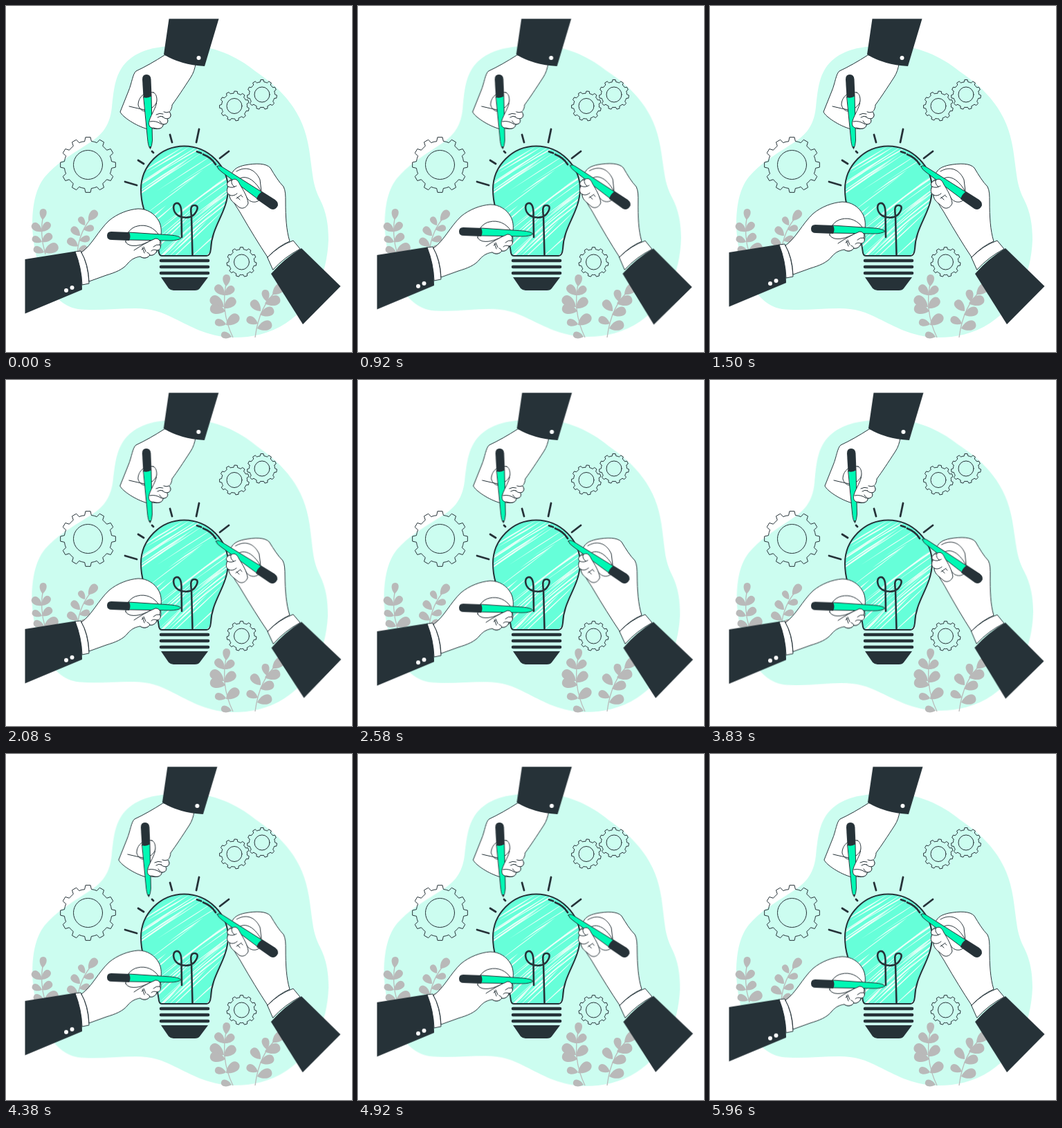
Recreate the animation shown at these times as an HTML page. Size 500x500 px, loop 6 s.

```html
<!DOCTYPE html>
<html lang="en">
<head>
<meta charset="utf-8">
<title>Drawing an idea</title>
<style>
html, body { margin: 0; width: 100%; height: 100%; overflow: hidden; background: #fff; }
svg { display: block; width: 100vw; height: 100vh; }
.blob { fill: #ccfdf0; }
.dark { fill: #263238; }
.thin { fill: none; stroke: #263238; stroke-width: 1; stroke-linecap: round; stroke-linejoin: round; }
.skin { fill: #fff; }
.pen { fill: #00f8b4; }
.thick { fill: none; stroke: #263238; stroke-width: 2.8; stroke-linecap: round; stroke-linejoin: round; }
.stem { fill: none; stroke: #b9b9b9; stroke-width: 1.3; }
.leaf { fill: #b9b9b9; }
#ground { transform-origin: 252px 268px; animation: wind 3s linear infinite; --a: -1deg; --b: 1deg; }
#right { transform-origin: 394px 344px; animation: wind 3s linear infinite; --a: 1deg; --b: -1deg; }
#left { animation: float 3s linear infinite; }
#top { animation: shake 6s linear infinite; }
@keyframes wind {
  0%, 100% { transform: rotate(0deg); }
  25% { transform: rotate(var(--a)); }
  75% { transform: rotate(var(--b)); }
}
@keyframes float {
  0%, 100% { transform: translateY(0); }
  50% { transform: translateY(-10px); }
}
@keyframes shake {
  0%, 100% { transform: translateX(0); }
  10%, 90% { transform: translateX(-1px); }
  20%, 80% { transform: translateX(2px); }
  30%, 50%, 70% { transform: translateX(-4px); }
  40%, 60% { transform: translateX(4px); }
}
</style>
</head>
<body>
<svg viewBox="0 0 500 500">
  <defs>
    <path id="glass" d="M225 361Q221 361 220.500 353C217 318 195 306 195 265C195 231 223 202.500 257.500 202.500C292 202.500 321 231 321 265C320 299 297 318 296 351Q295 361 290 361Z"/>
    <clipPath id="inside"><use href="#glass"/></clipPath>
  </defs>

  <path id="ground" class="blob" d="M38 318C38 290 42 265 56 247C72 228 94 215 114 202C136 189 150 176 153 146C156 118 158 96 176 79C194 63 219 58 245 58C291 53 330 70 360 94C400 121 430 153 438 207C444 248 443 258 454 280C463 298 466 316 466 338C464 390 443 433 405 458C379 475 350 480 325 479C290 477 267 463 244 452C225 442 209 437 187 437C160 437 130 441 104 438C60 430 40 370 38 318Z"/>

  <g id="plants"></g>
  <g id="gears" class="thin"></g>

  <g>
    <use href="#glass" fill="#66ffd9"/>
    <g id="streaks" clip-path="url(#inside)" fill="#e9fff8"></g>
    <use href="#glass" class="thick" style="stroke-width:2"/>
    <path class="thick" d="M276 210.500L282 212.500M285 214.500Q297 219 303 229"/>
    <path class="thick" style="stroke-width:2.600" d="M254 334L253.500 304C254 292 252 284 246 285C240 287 241 298 249 303C256 307 268 307 273 300C278 293 278 288 272 288C266 288 267 296 268 304L269.500 360"/>
    <path class="thick" style="stroke-width:4.600" d="M224 368H292M224 377H292M224 386H292"/>
    <path class="dark" d="M224 392H292L280 408Q278 411 273 411H242Q238 411 235 408Z"/>
    <path class="thick" d="M172 254L189 259M191 223L199 228M237 186L240 197M279 178L275 197M309 220L322 210M211 210L213 212"/>
  </g>

  <g id="right">
    <path class="dark" d="M383 387Q402 365 427 350L483.500 405L429 460Z"/>
    <path class="thin skin" d="M378 363Q395 346 415 339L425 351Q402 363 386 381Z"/>
    <path class="thin skin" d="M378 363C366 345 352 322 341 303C336 294 332 289 330 285C325 280 323 277 323 273C319 270 319 264 321 261C318 256 323 251 327 250L326 243C329 235 336 232 345 230C361 227 376 227 382 234C388 244 394 254 401 261C404 267 404 274 404 283C404 304 405 324 410 340Q393 347 378 363Z"/>
    <path class="thin blob" d="M335 252C340 245 350 247 357 253C365 260 371 270 370 276C364 286 353 285 348 277C344 269 338 262 335 252Z"/>
    <path class="thin" d="M333 239C346 231 360 235 367 251L370 276"/>
    <path class="thin pen" d="M305 232Q307 229 313 233L370 269L364 279L312 240Q306 236 305 232Z"/>
    <path class="dark" d="M370 268L389 280Q395 285 392 290Q388 296 382 293L362 279Q364 272 370 268Z"/>
    <path class="thin skin" d="M326 252C331 248 335 251 338 258C343 266 349 276 350 285C348 291 342 294 337 291L330 285C326 282 323 278 323 273C318 270 319 265 321 261C317 257 322 252 326 252Z"/>
    <path class="thin" d="M321 261Q327 264 333 260M323 273Q328 276 334 271M326 252Q325 258 330 261M333 278L340 273M334 276L338 280M340 274L342 276"/>
  </g>

  <g id="left">
    <path class="dark" d="M27.500 366L97 355Q102 354 104 359Q110 383 110 410L27.500 444.500Z"/>
    <path class="thin skin" d="M100 355L108 354Q119 373 120 401L110 403Q109 378 100 355Z"/>
    <path class="thin skin" d="M109 356C124 346 133 325 149 310C161 300 177 294 191 293C204 293 215 300 221 311C225 319 225 327 223 338C225 344 224 350 219 353C217 358 212 361 208 360C204 365 198 365 194 362C188 363 182 365 176 372C169 381 158 385 145 389L120 398Q119 373 109 356Z"/>
    <path class="thin blob" d="M173 341C172 330 180 320 190 318C202 315 214 320 221 331L209 339C201 343 191 348 180 346Q175 345 173 341Z"/>
    <path class="thin pen" d="M177 327L238 331Q250 332 253 335.500Q248 339 237 339L177 338Z"/>
    <path class="dark" d="M152 326L178 327Q181 333 178 339L153 338Q146 338 146 332Q146 326 152 326Z"/>
    <path class="thin skin" d="M185 353C194 347 206 340 216 336C222 336 224 341 222 345C225 349 222 353 218 353C217 358 212 361 208 360C204 365 198 365 194 362"/>
    <path class="thin" d="M222 345Q217 344 213 348M218 353Q213 351 210 354M208 360Q207 357 204 356M197 349L200 357M199 348L202 355M196 352L199 350"/>
    <circle cx="87" cy="411" r="3" fill="#fff"/>
    <circle cx="95.500" cy="407" r="3" fill="#fff"/>
  </g>

  <g id="top">
    <path class="thin skin" d="M229 71C215 80 201 88 188 94C183 98 182 111 177 123L165 153C168 160 187 173 205 178L212 177C222 179 227 176 227 171C233 171 235 167 233 163C239 162 239 156 236 153C239 150 240 146 240 143C248 132 256 120 267 103C271 97 273 90 274 84Z"/>
    <path class="thin blob" d="M213 125C200 123 191 132 191 143C193 150 199 154 205 151C212 147 218 142 218 136C218 130 216 126 213 125Z"/>
    <path class="thin" d="M178 145Q190 148 205 151"/>
    <path class="thin pen" d="M199 131L210 130L211.500 194Q211 203 208.500 206Q206 204 205 196Z"/>
    <path class="dark" d="M197 106Q197 99 203 99Q209 99 209.500 106L210.500 130Q205 134 198.500 132Z"/>
    <path class="dark" d="M207 203H210L208.500 207.500Z"/>
    <path class="thin skin" d="M218 138C217 147 210 156 207 166C205 173 209 177 213 176C222 179 227 176 227 171C233 171 235 167 233 163C239 162 239 156 236 153"/>
    <path fill="#fff" d="M218 138L239 143L236 154L220 150Z"/>
    <path class="thin" d="M208 167Q217 165 225 171M227 171Q223 169 222 166M233 163Q229 163 226 160M236 153Q232 155 228 153M217 157Q222 154 227 156M219 161Q223 158 227 160"/>
    <path class="dark" d="M235.500 18.500H307.500L287 87Q252 85 228 70Z"/>
    <circle cx="278.500" cy="75" r="3" fill="#fff"/>
  </g>
</svg>
<script>
const add = (id, name, attrs) => {
  const el = document.createElementNS("http://www.w3.org/2000/svg", name);
  for (const key in attrs) el.setAttribute(key, attrs[key]);
  document.getElementById(id).append(el);
};
const polar = (x, y, r, a) =>
  (x + r * Math.cos(a)).toFixed(2) + " " + (y + r * Math.sin(a)).toFixed(2);

function gear(x, y, r, hole, teeth, turn) {
  const step = 2 * Math.PI / teeth, root = r * 0.86, pts = [];
  for (let i = 0; i < teeth; i++) {
    const a = i * step - Math.PI / 2 + turn;
    for (const [k, d] of [[-0.27, root], [-0.17, r], [0.17, r], [0.27, root], [0.5, root]])
      pts.push(polar(x, y, d, a + k * step));
  }
  add("gears", "path", { d: "M" + pts.join("L") + "Z" });
  add("gears", "circle", { cx: x, cy: y, r: hole });
}
gear(118.5, 229.5, 40, 21, 12, 0);
gear(330, 144.5, 21.5, 11, 11, 0.1);
gear(370, 128, 21.5, 11, 11, 0);
gear(340.5, 370, 21.5, 11, 11, 0);

// Each leaf runs from its joint on the stem to its tip.
function plant(stem, leaves) {
  add("plants", "path", { d: stem, class: "stem" });
  for (const [x, y, tx, ty] of leaves) {
    const len = Math.hypot(tx - x, ty - y), w = len * 0.42;
    const turn = Math.atan2(ty - y, tx - x) * 180 / Math.PI;
    add("plants", "path", {
      class: "leaf",
      transform: `translate(${x} ${y}) rotate(${turn})`,
      d: `M0 0C${len * 0.4} ${-w} ${len} ${-w} ${len} 0C${len} ${w} ${len * 0.4} ${w} 0 0Z`
    });
  }
}
plant("M54 300Q48 330 57 359", [
  [53, 309, 54, 293], [52, 326, 38, 315], [52, 326, 63, 313],
  [52, 341, 38, 335], [52, 341, 66, 330], [55, 356, 40, 350], [55, 356, 75, 346]]);
plant("M127 302Q106 324 103 356", [
  [119, 310, 131, 296], [114, 317, 106, 305], [112, 323, 127, 320],
  [107, 332, 95, 320], [106, 339, 121, 335], [104, 347, 89, 337], [104, 354, 117, 348]]);
plant("M319 397Q309 440 328 479", [
  [318, 405, 319, 388], [316, 418, 303, 404], [316, 418, 329, 406],
  [315, 435, 296, 421], [315, 437, 331, 423], [317, 441, 295, 436],
  [318, 460, 302, 456], [318, 461, 336, 447], [326, 478, 311, 474]]);
plant("M393 410Q366 432 360 479", [
  [385, 417, 401, 403], [377, 427, 374, 410], [374, 430, 396, 423],
  [368, 441, 355, 426], [367, 446, 387, 439], [364, 459, 348, 451], [363, 466, 384, 459]]);

// Hatching steepens toward the base of the bulb.
let seed = 11;
const rand = () => (seed = seed * 16807 % 2147483647) / 2147483647;
for (let i = 0; i < 38; i++) {
  const y = 210 + i * 4, x = 205 + rand() * 105;
  const len = 25 + rand() * 60, w = 0.5 + rand() * 0.9;
  add("streaks", "path", {
    transform: `translate(${x} ${y}) rotate(${-30 - i * 0.42})`,
    d: `M${-len} 0L0 ${-w}L${len} 0L${len * 0.3} ${w}Z`
  });
}
</script>
</body>
</html>
```
